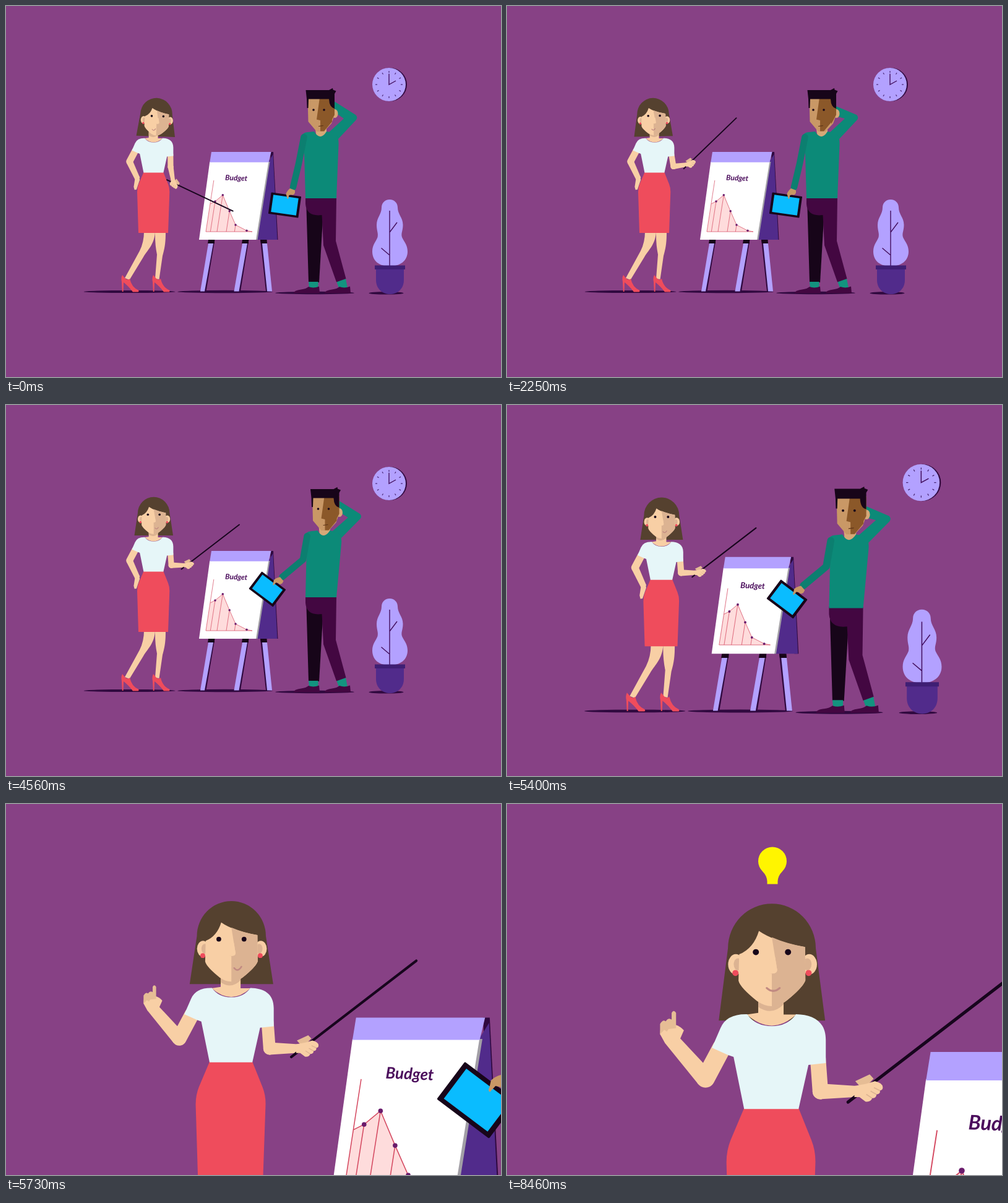
Recreate the animation shown at these times as an HTML page. Size 800 by 600 pixels, loop 8820 ms.

```html
<!DOCTYPE html>
<html lang="en">
<head>
<meta charset="utf-8">
<title>Budget talk</title>
<style>
html, body { margin: 0; width: 100%; height: 100%; overflow: hidden; background: #874185; }
svg { display: block; width: 100vw; height: 100vh; }
.skin { fill: #f8cfa5; } .shade { fill: #dcb392; } .knuckle { fill: #e6bd95; }
.hair { fill: #55412f; } .red { fill: #ef4c5c; } .shirt { fill: #e6f6f8; }
.lilac { fill: #b3a1ff; } .violet { fill: #512b8b; } .dark { fill: #30093f; }
.ink { fill: #170519; } .green { fill: #0c8a78; } .sleeve { fill: none; stroke: #0c7f70; stroke-linejoin: round; stroke-linecap: round; }
.plum { fill: #430741; } .tan { fill: #c99866; } .brown { fill: #8b5829; } .pale { fill: #d6a878; }
.line { fill: none; stroke: #430f5e; stroke-width: 1.4; }
.graph { fill: none; stroke: #d4475f; stroke-width: .7; }
</style>
</head>
<body>
<svg viewBox="0 0 800 600" preserveAspectRatio="none">
<rect width="800" height="600" fill="#874185"/>
<g id="cam">
  <!-- floor shadows -->
  <g class="dark">
    <ellipse cx="199.5" cy="462" rx="74" ry="2.1"/>
    <ellipse cx="354" cy="462" rx="77" ry="2.2"/>
    <ellipse cx="499" cy="464" rx="64" ry="2.2"/>
    <ellipse cx="614.5" cy="464.4" rx="28" ry="2.2"/>
  </g>

  <!-- clock -->
  <circle class="dark" cx="621" cy="127" r="27"/>
  <circle class="lilac" cx="619" cy="127" r="27"/>
  <g id="ticks" stroke="#43206d" stroke-width="1.1"></g>
  <path d="M619 109.500V127L630 121" class="line" stroke-width="1.6"/>

  <!-- plant -->
  <path class="lilac" d="M620 313C628 313 633 319 633 326C633 337 641.500 342 641.500 354C641.500 364 638 367 640 374C643 381 649 386 649 397C649 412 637 421 620 421C603 421 592 412 592 397C592 386 598 381 600.500 374C602 367 599 364 599 354C599 342 607 337 607 326C607 319 612 313 620 313Z"/>
  <path class="line" d="M620 331V420M620 366L632 350M620 403L606.500 391.500"/>
  <path class="violet" d="M598 425H643V443C643 458 632 466 620.500 466C609 466 598 458 598 443Z"/>
  <path fill="#3f1f74" d="M596 419.500H645V426H596Z"/>

  <!-- easel -->
  <path class="dark" d="M328 378H337.500L323.500 461.500H318ZM383 378H392.500L379 461.500H373ZM411 378H420L425 461.500H420Z"/>
  <path class="lilac" d="M327 384H335L321 461.500H314ZM382 384H390L376.500 461.500H368.500ZM414 384H422L430 461.500H422Z"/>
  <path class="ink" d="M327 378H337V384H326ZM382 378H392V384H381ZM411 378H421.500L422 384H412Z"/>
  <path class="dark" d="M427 236H432L439.500 378H433Z"/>
  <path class="violet" d="M424 252L431.500 240L438.500 378H404Z"/>
  <path fill="#a29fa6" d="M422 252H426.500L406.500 378H402Z"/>
  <path fill="#fff" d="M329.300 252H424.300L404 378H312Z"/>
  <path class="lilac" d="M332 236H428.500L424.500 252.700H329.300Z"/>
  <text x="354" y="281.500" transform="rotate(2.300 354 281.500)" font-family="Lato, 'Open Sans', sans-serif" font-weight="700" font-style="italic" font-size="11.900" fill="#4b0d5c">Budget</text>
  <g id="chart"></g>

  <!-- woman -->
  <path class="skin" d="M223 365H241C240 385 230 393 222 406L199.500 443L192 440L216 396Q223 382 223 365ZM241 365H258C258 382 257 390 253 404L247.500 442L241 441L244 402Q240.500 385 241 365Z"/>
  <path id="shoe" class="red" d="M188 435L193 441Q197 444 200 441Q203 455 214 459.500Q215.500 462.500 213 462.500H205Q198 453 190 447L189.500 462H187.800L187 446Q185.500 440 188 435Z"/>
  <use href="#shoe" x="50"/>
  <path d="M209 234L199.700 251.500" stroke="#f8cfa5" stroke-width="11" stroke-linecap="round"/>
  <g id="restArm">
    <path class="skin" d="M0 -5.300L31 -4.200V4.200L0 5.300Z"/>
    <path id="hipHand" class="skin" d="M28 -4.300L34 -2.500L46 9L45 12L40 11L30 4.300Z"/>
    <g id="upHand" transform="rotate(-229) translate(-199.500 -251.500)">
      <path class="skin" d="M173.300 222L182 220Q185 221 187 223.300L184.500 229L176 231L173 225.500Z"/>
      <path class="knuckle" d="M173 225.500V219.500Q174.800 216.500 176.300 218Q178 215.500 179.800 217V213Q181 210.800 182.400 213V222L178 222.500L177 224L175.500 223Z"/>
    </g>
  </g>
  <path class="red" d="M222.400 269H254.400L262 288Q264.400 294 264.300 301L262 367H214L212 301Q212 294 214.400 288Z"/>
  <g id="hairBox"><path id="hair" class="hair"/></g>
  <path class="skin" d="M230.700 200H245.600V214L253 214Q238.700 227 224 214L230.700 213Z"/>
  <path class="shade" d="M230.700 204H245.600V208Q238.700 215 230.700 209.500Z"/>
  <path id="upper" stroke="#f8cfa5" stroke-width="9.200" fill="none" stroke-linecap="round"/>
  <path class="shirt" d="M224.200 213.800Q229 220.800 238.700 220.800Q248 220.800 252.900 213.800C263 214 270.400 218 270.400 229V242.500L260.200 243.600L254.400 269.500H222.400L216.200 238.900L213 237.800L203.500 233.500L208.500 222Q212 213.500 224.200 213.800Z"/>
  <g id="faceBox">
    <ellipse class="skin" cx="217.500" cy="184.400" rx="4.500" ry="6"/><ellipse class="shade" cx="218.800" cy="184.400" rx="2.500" ry="3.600"/>
    <ellipse class="skin" cx="260.700" cy="184.400" rx="4.500" ry="6"/><ellipse class="shade" cx="259.500" cy="184.400" rx="2.500" ry="3.600"/>
    <circle class="red" cx="217.300" cy="189.500" r="1.800"/><circle class="red" cx="260.300" cy="189.500" r="1.800"/>
    <path class="skin" d="M231.100 164.700Q240 171 258.200 174.200L258.400 193.800Q257 198 247 206Q238.700 212 230 206Q220 198 219.100 194L219.500 178.500Q228 175 231.100 164.700Z"/>
    <path class="shade" d="M238.700 168.500Q248 172.500 258.200 174.200L258.400 193.800Q257 198 247 206Q243 209.200 238.700 209.200V190L236.900 189.600Q242 190.500 241.800 187.500Z"/>
    <g id="look">
      <path class="skin" d="M237.500 180L240.600 180L241.800 187.500Q242 190 236.900 189.600Z"/>
      <ellipse class="ink eye" cx="229.300" cy="177.100" rx="1.800"/><ellipse class="ink eye" cx="248.200" cy="177.100" rx="1.800"/>
      <path id="mouth" fill="none" stroke="#c18a82" stroke-width="1.200" stroke-linecap="round"/>
    </g>
  </g>
  <g id="fore">
    <circle class="skin" r="4.600"/>
    <path class="skin" d="M0 -4.600L21.500 -3.200V3.200L0 4.600Z"/>
  </g>
  <path id="stick" stroke="#17051d" stroke-width="1.900" stroke-linecap="round"/>
  <g id="hand">
    <path class="knuckle" d="M-.500 -6L8 -10L10.300 -7.500L4 -1Z"/>
    <path class="skin" d="M-1 -3.200L6 -4.500L11 -6Q15.500 -5 15.700 -2.500Q15.800 -.800 14 -.500Q14.500 1.500 12 1.800Q12 4 9.500 4Q8.500 6.500 5.500 6L2 3.300H-1Z"/>
    <path d="M14 -.500L10.500 -2.200M12 1.800L8.500 -.200M9.500 4L6 1.700" stroke="#dcb392" stroke-width=".600"/>
  </g>

  <!-- man -->
  <path class="ink" d="M485 311H514L506 447H489Z"/>
  <path fill="#13937f" d="M489 446H504.500V456H490ZM534 445L549 441L552 456H538Z"/>
  <path id="boot" class="plum" d="M489 454Q497 457 506 453.500L507 464.500H465Q465 460 477 458.500Q485 457.500 489 454Z"/>
  <use href="#boot" x="50"/>
  <path class="plum" d="M484 309H534L533 380L549.500 441L534 446.500L513 387L510.500 338Q485.500 341 484 320Z"/>
  <g id="torso">
    <path id="scratch" class="green"/>
    <path class="pale" d="M499 192H518V206L514 213H502Z"/>
    <path class="green" d="M498 203Q508 219 518 203L529 205Q538 208 537.500 224L534 311H484L482 240L476 216Q478 204 488 204Z"/>
  </g>
  <g id="manHead">
    <ellipse class="pale" cx="531.500" cy="174" rx="5" ry="7"/>
    <path class="tan" d="M487.500 147H531V176L526 190L514 203H502L488.500 187Z"/>
    <g id="manLook">
      <path class="brown" d="M507 148H527V187L514 202.500H508V185L502 183.500Z"/>
      <circle class="pale" cx="0" cy="0" r="0"/>
      <ellipse class="ink eye" cx="497" cy="168" rx="1.800"/><ellipse class="ink eye" cx="514" cy="168" rx="1.800"/>
      <path d="M505.500 194.500L512.500 193.500" stroke="#5d3418" stroke-width="1.100" stroke-linecap="round"/>
    </g>
    <path class="brown" d="M523 148H531V176L523 191Z"/>
    <path class="ink" d="M484.500 136H522L528 132.800L528.500 135.500L533.500 137.500L531 142V166Q522.500 164 522 150.500H489L488.500 165L486.500 165L486 150Z"/>
  </g>
  <path id="manArm" class="sleeve" stroke-width="10.500"/>
  <g id="tablet">
    <g transform="translate(-12.500 25) rotate(8)">
      <rect class="ink" x="-24.500" y="-17.500" width="49" height="35" rx="1"/>
      <rect x="-20.500" y="-14" width="41" height="28" fill="#0abcff"/>
    </g>
    <path class="tan" d="M-4 -2L4 1L4 5Q2 10 -2 8L-5.500 9L-7 15Q-9 15 -9 12L-10.500 7Q-9 2 -4 -2Z"/>
  </g>
</g>
<g id="rays" stroke="#fff500" stroke-width="4" stroke-linecap="round"></g>
<path id="bulb" fill="#fff500" d="M420.500 129.500V125Q420 116 413 109A23 23 0 1 1 445 109Q438 116 437.500 125V129.500Z"/>
</svg>
<script>
const LOOP = 8820;
const $ = id => document.getElementById(id);
const set = (id, name, value) => $(id).setAttribute(name, value);
const move = (id, value) => set(id, 'transform', value);
const mix = (a, b, k) => a + (b - a) * k;
const clamp = v => Math.max(0, Math.min(1, v));
const span = (t, a, b) => clamp((t - a) / (b - a));
const smooth = k => k * k * (3 - 2 * k);
const rad = d => d * Math.PI / 180;

// clock ticks
for (let i = 0; i < 12; i++) {
  const c = Math.cos(rad(i * 30)), s = Math.sin(rad(i * 30));
  $('ticks').innerHTML += `<path d="M${619 + 19 * c} ${127 + 19 * s}L${619 + 22 * c} ${127 + 22 * s}"/>`;
}

// falling chart
const dots = [[338, 316], [350.3, 305.8], [361.2, 331.8], [371, 354], [389, 363.3]];
const outline = 'M330 320' + dots.map(p => 'L' + p).join('') + 'L398 365';
$('chart').innerHTML =
  `<path d="${outline}H323Z" fill="#fedcdc"/>` +
  `<path class="graph" d="M335.800 282L323 365H398${outline}"/>` +
  dots.map(([x, y]) => `<path class="graph" d="M${x} ${y}L${x - (365 - y) * 0.157} 365"/>`).join('') +
  dots.map(([x, y]) => `<circle cx="${x}" cy="${y}" r="1.750" fill="#6a1c6c"/>`).join('');

// head dx, tilt, look x, look y, mouth x, elbow x, elbow y, forearm, pointer,
// man: lean, head dx, tilt, look x, elbow x, elbow y, wrist x, wrist y, tablet
const graphPose = [3, 2, 2, 1, -6, 266, 260, 80, 25.3, 0, 0, 0, 0, 473, 255, 463, 297, 0];
const talkPose = [-2, -1, 1.5, 0.5, -2, 269, 259.5, -8, -44, 0, 1, 0, -3, 473, 255, 463, 297, 0];
const titlePose = [1.5, 2, 3, 2, 0, 271, 259.5, 24, -4, -4, -8, -4, 0, 471, 250, 444, 288, 24];
const restPose = [0, 0, 0, 0.2, 4, 267.2, 259.2, 0, -37.6, 5.5, 7.5, 0, 0, 480, 250, 445.5, 282, 29];
const keys = [[0, graphPose], [700, graphPose], [1500, talkPose], [2500, talkPose],
  [3350, titlePose], [3750, titlePose], [4480, restPose], [LOOP, restPose]];

function pose(t) {
  let i = 0;
  while (i < keys.length - 2 && t >= keys[i + 1][0]) i++;
  const [a, from] = keys[i], [b, to] = keys[i + 1];
  const k = smooth(span(t, a, b));
  return from.map((v, n) => mix(v, to[n], k));
}

function bezier(x, x1, x2) {
  let lo = 0, hi = 1;
  for (let i = 0; i < 24; i++) {
    const u = (lo + hi) / 2, v = 1 - u;
    if (3 * x1 * u * v * v + 3 * x2 * u * u * v + u * u * u < x) lo = u; else hi = u;
  }
  return smooth(lo);
}

function backOut(k) {
  const q = k - 1;
  return 1 + 2.7 * q * q * q + 1.7 * q * q;
}

function drawWoman(t, p) {
  const [dx, tilt, lx, ly, mx, ex, ey, fa, pa] = p;
  const nod = smooth(span(t, 6390, 6660));
  const lift = -1.4 * (nod - smooth(span(t, 8220, 8460)));
  const tip = `translate(${dx} 0) rotate(${tilt} 238.7 212)`;
  move('hairBox', tip);
  move('faceBox', `${tip} translate(${lx * 0.4} ${ly * 0.4 + lift})`);
  move('look', `translate(${lx * 0.6} ${ly * 0.6})`);

  const drop = t < 6510 ? mix(210.9, 225.5, smooth(span(t, 6390, 6510)))
                        : mix(225.5, 217.5, smooth(span(t, 6510, 6660)));
  set('hair', 'd', `M207.500 ${drop}L212.900 175A25.800 26.200 0 0 1 264.500 175L270 ${drop}Z`);

  const x = 239.5 + mix(mx, 0, nod), w = mix(2.7, 3.8, nod), slant = mix(0.5, 0, nod);
  set('mouth', 'd', `M${x - w} ${198.2 + slant}Q${x} ${201.6 + slant} ${x + w} ${198.2 - slant}`);

  const up = smooth(span(t, 5420, 5700));
  move('restArm', `translate(199.500 251.500) rotate(${mix(65, 229, up)})`);
  set('hipHand', 'display', up < 0.4 ? 'inline' : 'none');
  set('upHand', 'display', up < 0.4 ? 'none' : 'inline');

  const c = Math.cos(rad(fa)), s = Math.sin(rad(fa));
  const wx = ex + 21 * c, wy = ey + 21 * s;
  const gx = wx + 8 * c + 3.5 * s, gy = wy + 8 * s - 3.5 * c;
  const px = Math.cos(rad(pa)), py = Math.sin(rad(pa));
  set('upper', 'd', `M265.800 240L${ex} ${ey}`);
  move('fore', `translate(${ex} ${ey}) rotate(${fa})`);
  move('hand', `translate(${wx} ${wy}) rotate(${fa})`);
  set('stick', 'd', `M${gx - 16 * px} ${gy - 16 * py}L${gx + 102 * px} ${gy + 102 * py}`);
}

function drawMan(t, p) {
  const [lean, dx, tilt, look, ex, ey, wx, wy, turn] = p.slice(9);
  const skew = -lean / 106;
  move('torso', `matrix(1 0 ${skew} 1 ${-skew * 311} 0)`);
  move('manHead', `translate(${dx} 0) rotate(${tilt} 508 203)`);
  move('manLook', `translate(${look} 0)`);
  const h = 156 - 4 * Math.cos(Math.min(t, 4750) / 500 * 2 * Math.PI);
  set('scratch', 'd', `M527 ${h}L565 176Q569 180 566 184L537 215L520 206L546 182L527 ${h + 17}Z`);
  set('manArm', 'd', `M${481.500 + lean * 0.93} 212L${ex} ${ey}L${wx + 1} ${wy - 4}`);
  move('tablet', `translate(${wx} ${wy}) rotate(${turn})`);
}

function drawBulb(t) {
  const k = span(t, 5820, 6090);
  set('bulb', 'display', k > 0 ? 'inline' : 'none');
  move('bulb', `translate(429 129) scale(${Math.max(0, backOut(k))}) translate(-429 -129)`);
  const r = span(t, 6000, 6250);
  let rays = '';
  if (r > 0 && r < 1) {
    const near = mix(30, 57, r), far = mix(34, 57, Math.sqrt(r));
    for (let a = 180; a <= 360; a += 45) {
      const c = Math.cos(rad(a)), s = Math.sin(rad(a));
      rays += `<path d="M${430 + near * c} ${85 + near * s}L${430 + far * c} ${85 + far * s}"/>`;
    }
  }
  $('rays').innerHTML = rays;
}

const eyes = document.querySelectorAll('.eye');

function draw(t) {
  const p = pose(t);
  const zoom = 1 + 1.75 * bezier(span(t, 5250, 6120), 0.45, 0.46);
  move('cam', `translate(${-130.5 * (zoom - 1)} ${-141.7 * (zoom - 1)}) scale(${zoom})`);
  const blink = Math.sin(Math.PI * span(t, 4560, 4740));
  eyes.forEach(e => e.setAttribute('ry', 1.8 - 1.5 * blink));
  drawWoman(t, p);
  drawMan(t, p);
  drawBulb(t);
}

const start = performance.now();
function tick() {
  draw((performance.now() - start) % LOOP);
  requestAnimationFrame(tick);
}
tick();
</script>
</body>
</html>
```
